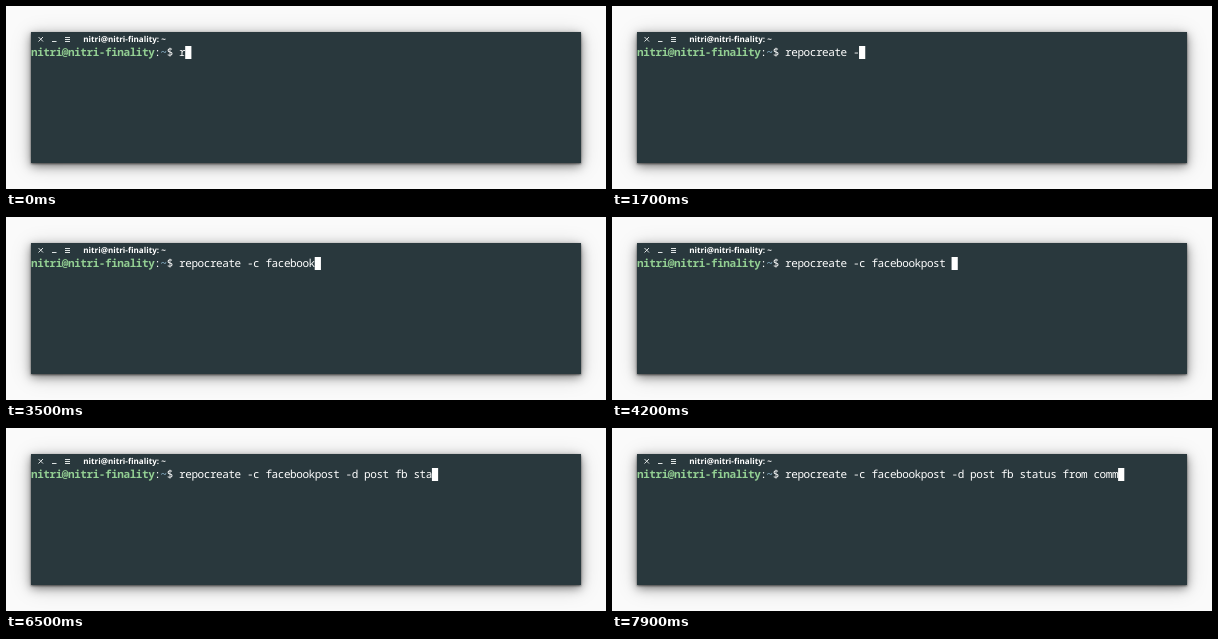
Animation, 600 px wide and 183 px high, one loop 8000 ms. Source, as an HTML page:

```html
<!DOCTYPE html>
<html lang="en">
<head>
<meta charset="utf-8">
<title>Terminal typing</title>
<style>
  html, body { margin: 0; width: 100%; height: 100%; overflow: hidden; background: #fafafa; }
  .window {
    position: absolute; left: 25px; top: 26px; width: 550px; height: 131px;
    background: #29383d;
    box-shadow: 0 1px 2px rgba(0, 0, 0, .55), 0 3px 9px rgba(0, 0, 0, .45), 0 3px 20px rgba(0, 0, 0, .18);
  }
  svg { display: block; }
  text { text-rendering: geometricPrecision; white-space: pre; fill: #fff; }
  .title { font: bold 8.1px "Open Sans", "Noto Sans", sans-serif; }
  .line { font: 500 11px "Noto Sans Mono", monospace; letter-spacing: -.432px; }
  .user { font-weight: 600; fill: #93cf93; }
  .path { fill: #8fb8d0; }
  .icons { fill: none; stroke: #dfe4e4; stroke-width: 1; }
</style>
</head>
<body>
<div class="window">
  <svg width="550" height="131">
    <path class="icons" d="M7.5 5l4.5 4.5M12 5l-4.5 4.5M21 9.5h4.5M34 5.5h5M34 7.5h5M34 9.5h5"/>
    <text class="title" x="52.2" y="10">nitri@nitri-finality: ~</text>
    <text class="line" x="0" y="24.2"><tspan class="user">nitri@nitri-finality</tspan>:<tspan class="path">~</tspan>$ <tspan id="typed"></tspan></text>
    <rect id="cursor" y="14" width="6.2" height="13" fill="#fff"/>
  </svg>
</div>
<script>
  const LOOP = 8000, TICK = 100, KEY = 85, BLINK = 600, CELL = 6.168, PROMPT = 24;

  // Start time of each burst of typing; the screen refreshes once per tick
  const script = [
    [0, "rep"], [700, "o"], [1085, "create -"], [1900, "c "], [2760, "facebo"],
    [3400, "ok"], [3800, "post -"], [4615, "d "], [5415, "po"], [5615, "st"],
    [5900, " fb"], [6215, " status "], [7015, "from co"], [7800, "mm"]
  ];
  const keys = script.flatMap(([start, text]) => [...text].map((char, i) => (
    { char, time: Math.ceil((start + i * KEY) / TICK) * TICK }
  )));

  const typed = document.getElementById("typed");
  const cursor = document.getElementById("cursor");

  function draw(time) {
    const t = time % LOOP;
    const shown = keys.filter(key => key.time <= t);
    const idle = t - shown.at(-1).time;
    typed.textContent = shown.map(key => key.char).join("");
    cursor.setAttribute("x", (PROMPT + shown.length) * CELL);
    cursor.setAttribute("visibility", idle < BLINK ? "visible" : "hidden");
  }

  const begin = performance.now();
  function tick() {
    draw(performance.now() - begin);
    requestAnimationFrame(tick);
  }
  tick();
</script>
</body>
</html>
```
